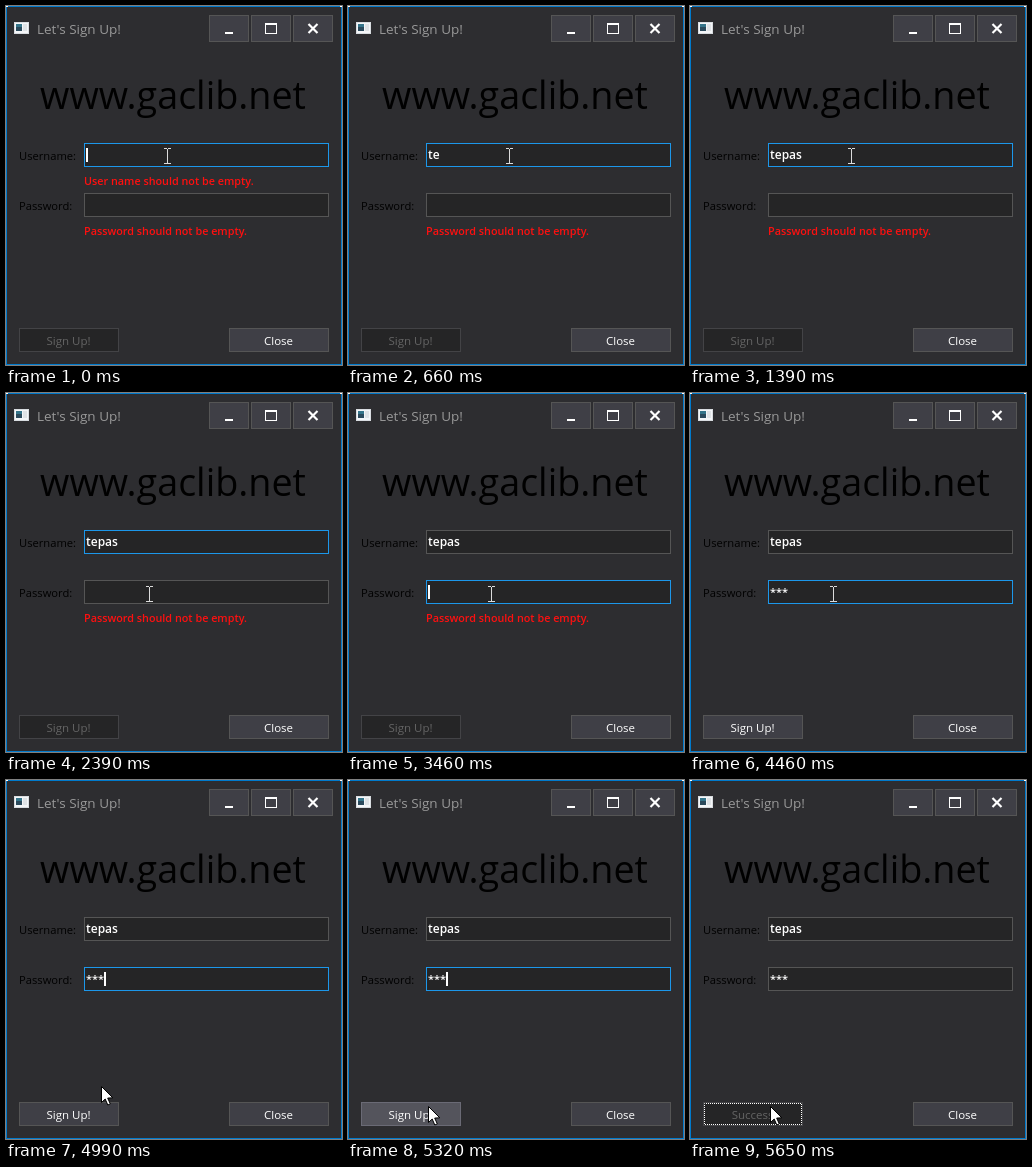
An HTML page with a canvas for the animation above (6.32 s loop, 336x359 px).

```html
<!DOCTYPE html>
<html lang="en">
<head>
<meta charset="utf-8">
<title>Let's Sign Up!</title>
<style>
html, body { margin: 0; width: 100%; height: 100%; overflow: hidden; background: #2d2d30; }
canvas { display: block; width: 336px; height: 359px; }
</style>
</head>
<body>
<canvas id="stage"></canvas>
<script>
const W = 336, H = 359, LOOP = 6320;
const FONT = '"Open Sans", "Noto Sans", sans-serif';
const USER = 'tepas';
const BG = [45, 45, 48], DIM = [37, 37, 38], GRAY = [67, 67, 70], BLUE = [28, 151, 234];
const FACE = [63, 63, 70], EDGE = [85, 85, 85];
const HOVER = [84, 84, 92], HOVER_EDGE = [106, 106, 117];
const PRESS = [0, 122, 204];

const USER_KEYS = [530, 660, 730, 860, 990];
const PASS_KEYS = [3660, 3930, 4460];
const FOCUS_PASS = 2590, PRESSED = 5450, RELEASED = 5590, DONE = 5650;

// Caret visibility: each entry flips it, starting visible.
const BLINKS = [330, 860, 1390, 1930, 2390, 2590, 2920, 3460, 3930, 4990, 5450];

// Pointer: start time, x, y, is arrow
const POINTER = [
  [0, 161, 150, 0], [1930, 156, 164, 0], [1990, 147, 189, 0], [2060, 143, 199, 0], [2390, 143, 201, 0],
  [4790, 134, 221, 1], [4860, 123, 250, 1], [4930, 109, 281, 1], [4990, 95, 306, 1],
  [5060, 86, 320, 1], [5120, 82, 326, 1], [5190, 80, 327, 1], [5320, 80, 326, 1]
];

const WEAK_PASSWORD = [
  'Password should contain at least one lower',
  'case letter, one upper case letter and one',
  'digit.'
];

const canvas = document.getElementById('stage');
const dpr = window.devicePixelRatio || 1;
canvas.width = Math.round(W * dpr);
canvas.height = Math.round(H * dpr);
const ctx = canvas.getContext('2d');
ctx.scale(dpr, dpr);

const rgb = c => `rgb(${c.join(',')})`;
const mix = (a, b, k) => a.map((v, i) => Math.round(v + (b[i] - v) * k));
const passed = (times, t) => times.filter(s => t >= s).length;
// Three-step fade, one step per 65 ms
const fade = (t, start) => t < start ? 0 : Math.min(3, Math.floor((t - start) / 65) + 1) / 3;

function rect(x, y, w, h, color) {
  ctx.fillStyle = color;
  ctx.fillRect(x, y, w, h);
}

function box(x, y, w, h, edge, fill) {
  rect(x, y, w, h, edge);
  rect(x + 1, y + 1, w - 2, h - 2, fill);
}

function text(str, x, y, size, color, weight = 400, align = 'left') {
  ctx.font = `${weight} ${size}px ${FONT}`;
  ctx.textAlign = align;
  ctx.fillStyle = color;
  ctx.fillText(str, x, y);
}

function path(points, close) {
  ctx.beginPath();
  points.forEach(([x, y]) => ctx.lineTo(x, y));
  if (close) ctx.closePath();
}

function titleBar() {
  box(8, 16, 15, 12, '#d8dce0', '#f4f6f8');
  rect(10, 18, 6, 7, '#2b4a5c');
  rect(10, 18, 6, 3, '#35758a');
  rect(17, 18, 4, 7, '#dfe3e6');
  text("Let's Sign Up!", 31, 28, 13.5, '#999999');

  for (const x of [203, 245, 287]) box(x, 9, 40, 27, rgb(EDGE), rgb(FACE));
  rect(219, 26, 8, 2, '#fff');
  box(259, 17, 12, 11, '#fff', rgb(FACE));
  rect(259, 17, 12, 2, '#fff');
  ctx.strokeStyle = '#fff';
  ctx.lineWidth = 2.2;
  path([[302.5, 18], [311.5, 27]]);
  ctx.stroke();
  path([[311.5, 18], [302.5, 27]]);
  ctx.stroke();
}

function field(label, y, str, size, focus, caret) {
  text(label, 13, y + 17, 11.2, '#000');
  box(78, y, 245, 24, rgb(mix(EDGE, BLUE, focus)), rgb(DIM));
  text(str, 80, y + 16, size, '#fff', 600);
  if (caret) rect(80 + Math.round(ctx.measureText(str).width), y + 5, 2, 14, '#fff');
}

function error(lines, y) {
  lines.forEach((line, i) => text(line, 78, y + i * 16, 10.8, '#ff1010', 600));
}

function button(label, x, edge, fill, color, weight = 500) {
  box(x, 322, 100, 24, rgb(edge), rgb(fill));
  text(label, x + 49.5, 339, 11.5, color, weight, 'center');
}

function focusDots() {
  ctx.strokeStyle = '#fff';
  ctx.lineWidth = 1;
  ctx.setLineDash([1, 1]);
  ctx.lineDashOffset = 0.5;
  ctx.strokeRect(14.5, 323.5, 97, 21);
  ctx.setLineDash([]);
}

function signUp(t, ready) {
  if (t >= DONE) button('Success', 13, GRAY, DIM, '#656565', 400);
  else if (!ready) button('Sign Up!', 13, GRAY, DIM, '#656565', 400);
  else if (t >= PRESSED && t < RELEASED) button('Sign Up!', 13, PRESS, PRESS, '#fff');
  else {
    const k = fade(t, 5060);
    button('Sign Up!', 13, mix(EDGE, HOVER_EDGE, k), mix(FACE, HOVER, k), '#fff');
  }
  if (t >= PRESSED) focusDots();
}

function pointer(t) {
  const [, x, y, arrow] = POINTER[passed(POINTER.map(p => p[0]), t) - 1];
  if (!arrow) {
    const c = '#dcdcdc';
    rect(x, y - 7, 1, 15, c);
    for (const dy of [-8, 7]) {
      rect(x - 3, y + dy, 3, 1, c);
      rect(x + 1, y + dy, 3, 1, c);
    }
    return;
  }
  ctx.save();
  ctx.translate(x + 0.5, y + 0.5);
  path([[0, 0], [0, 16], [3.7, 12.5], [6.3, 18.5], [8.8, 17.4], [6.2, 11.6], [11.3, 11.3]], true);
  ctx.fillStyle = '#fff';
  ctx.fill();
  ctx.strokeStyle = '#000';
  ctx.lineWidth = 1;
  ctx.stroke();
  ctx.restore();
}

function draw(t) {
  box(0, 0, W, H, '#007acc', rgb(BG));
  for (const x of [0, W - 2]) rect(x, 0, 2, 1, '#fff');
  titleBar();
  text('www.gaclib.net', 167, 103, 37.7, '#000', 400, 'center');

  const typed = passed(USER_KEYS, t), stars = passed(PASS_KEYS, t);
  const caret = passed(BLINKS, t) % 2 === 0;
  const toPass = fade(t, FOCUS_PASS), onPass = t >= FOCUS_PASS;

  field('Username:', 137, USER.slice(0, typed), 12, 1 - toPass, caret && !onPass);
  field('Password:', 187, '*'.repeat(stars), 11, t < PRESSED ? toPass : 0,
    caret && onPass && t < PRESSED);

  if (!typed) error(['User name should not be empty.'], 179);
  if (!stars) error(['Password should not be empty.'], 229);
  else if (stars < 3) error(WEAK_PASSWORD, 229);

  signUp(t, stars === 3);
  button('Close', 223, EDGE, FACE, '#fff');
  pointer(t);
}

const start = performance.now();
function tick() {
  draw((performance.now() - start) % LOOP);
  requestAnimationFrame(tick);
}
tick();
</script>
</body>
</html>
```
